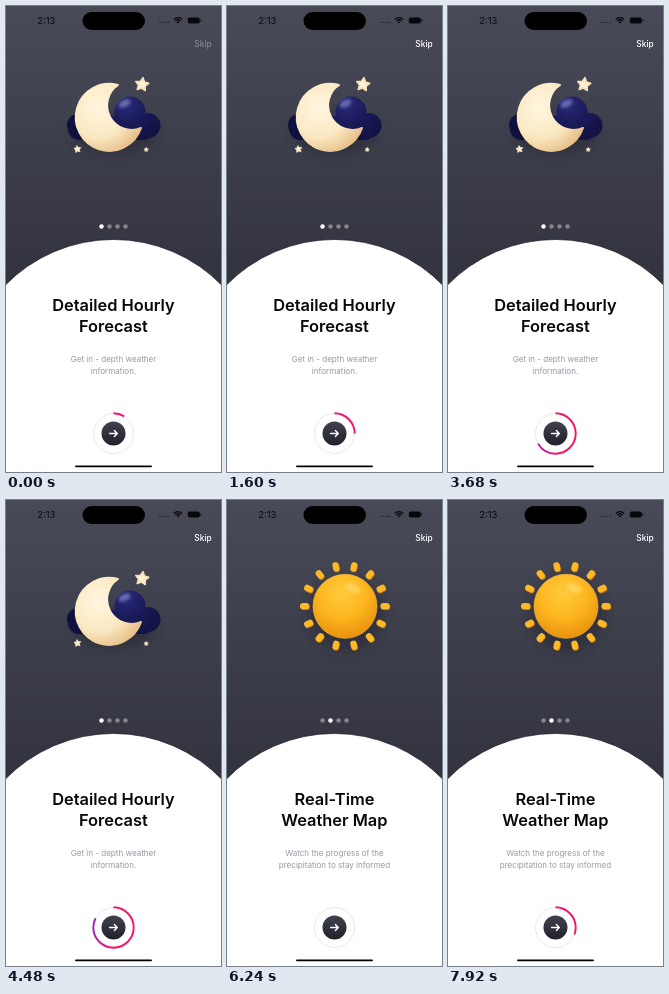
These frames come from a looping animation (215 by 466 pixels, 8 s). An HTML page:

```html
<!DOCTYPE html>
<html lang="en">
<head>
<meta charset="utf-8">
<title>Weather onboarding</title>
<style>
  html, body { margin: 0; width: 100%; height: 100%; overflow: hidden; background: #fff; }
  svg { display: block; width: 100vw; height: 100vh; font-family: Inter, Roboto, sans-serif; }
  .title { font-size: 16.4px; font-weight: 600; fill: #08080c; text-anchor: middle; }
  .note { font-size: 8.05px; fill: #9799a4; text-anchor: middle; }
</style>
</head>
<body>
<svg viewBox="0 0 215 466">
  <defs>
    <linearGradient id="sky" x2="0" y2="1">
      <stop stop-color="#484a58"/><stop offset="1" stop-color="#31323d"/>
    </linearGradient>
    <radialGradient id="moonFill" cx=".35" cy=".35" r=".75">
      <stop stop-color="#fff6df"/><stop offset=".6" stop-color="#fbe8c2"/><stop offset="1" stop-color="#e6bd85"/>
    </radialGradient>
    <radialGradient id="cloudFill" gradientUnits="userSpaceOnUse" cx="120" cy="98" r="46">
      <stop stop-color="#2a2a78"/><stop offset=".4" stop-color="#1b1b5c"/><stop offset="1" stop-color="#10103e"/>
    </radialGradient>
    <radialGradient id="sunFill" cx=".45" cy=".3" r=".75">
      <stop stop-color="#ffcb3c"/><stop offset=".5" stop-color="#fdb61f"/><stop offset="1" stop-color="#e58d0b"/>
    </radialGradient>
    <linearGradient id="ringStroke" gradientUnits="userSpaceOnUse" x1="107" y1="0" x2="87" y2="0"
      gradientTransform="rotate(90 107.5 427.5)">
      <stop stop-color="#f8106a"/><stop offset="1" stop-color="#a11fb8"/>
    </linearGradient>
    <linearGradient id="buttonFill" x2="0" y2="1">
      <stop stop-color="#41424f"/><stop offset="1" stop-color="#20212a"/>
    </linearGradient>
    <filter id="blur" x="-50%" y="-50%" width="200%" height="200%"><feGaussianBlur stdDeviation="6"/></filter>
    <filter id="glow" x="-50%" y="-50%" width="200%" height="200%"><feGaussianBlur stdDeviation="1.8"/></filter>
    <g id="rays"></g>
  </defs>

  <rect width="215" height="290" fill="url(#sky)"/>
  <path d="M-2 280.5A151 151 0 0 1 217 280.5V468H-2Z" fill="#fff" stroke="#1b1c27" stroke-width=".7"/>

  <!-- status bar -->
  <text x="31.2" y="18" font-size="9.5" fill="#0c0c11">2:13</text>
  <rect x="76.5" y="6" width="62.5" height="18" rx="9"/>
  <g fill="#08080c">
    <g id="signal" opacity=".75"></g>
    <rect x="181.8" y="11.6" width="12" height="5.8" rx="1.6"/>
    <rect x="194.4" y="13.4" width="1" height="2.2" rx=".5"/>
    <path d="M172 17.6l-1.5-1.7a2.2 2.2 0 0 1 3 0Z"/>
  </g>
  <path d="M167.8 13.4a6 6 0 0 1 8.4 0M169.3 15a3.9 3.9 0 0 1 5.4 0"
    fill="none" stroke="#08080c" stroke-width="1.3"/>
  <text id="skip" x="188.3" y="41.2" font-size="8.4" font-weight="500" fill="#fff">Skip</text>

  <g id="night">
    <ellipse cx="108" cy="128" rx="42" ry="20" fill="#1d1e29" opacity=".4" filter="url(#blur)"/>
    <g fill="url(#cloudFill)">
      <circle cx="72" cy="119" r="11"/>
      <rect x="62" y="110" width="86" height="24" rx="11"/>
      <circle cx="142" cy="119.5" r="12.5"/>
      <circle cx="124" cy="106" r="15.5"/>
    </g>
    <ellipse cx="118.5" cy="97.5" rx="6.5" ry="3.5" fill="#8f95d8" opacity=".6"
      transform="rotate(-25 118.5 97.5)" filter="url(#glow)"/>
    <path d="M112 79A33.5 33.5 0 1 0 135 122A24.5 24.5 0 0 1 112 79Z"
      fill="url(#moonFill)" stroke="url(#moonFill)" stroke-width="2" stroke-linejoin="round"/>
    <g id="stars" fill="#fdf1d8" stroke="#f8dfb6" stroke-linejoin="round"></g>
    <text class="title"><tspan x="107.4" y="305.4">Detailed Hourly</tspan><tspan x="107.4" y="325.6">Forecast</tspan></text>
    <text class="note"><tspan x="107.5" y="355.5">Get in - depth weather</tspan><tspan x="107.5" y="368.2">information.</tspan></text>
  </g>

  <g id="day">
    <circle cx="119" cy="114" r="38" fill="#1d1e29" opacity=".4" filter="url(#blur)"/>
    <use href="#rays" x=".4" y=".6" fill="#d9820c"/>
    <use href="#rays" x="-.2" y="-.3" fill="#fdb828"/>
    <circle cx="118" cy="106.3" r="32" fill="url(#sunFill)" stroke="#f9b63a" stroke-width=".7"/>
    <ellipse cx="126" cy="88" rx="8" ry="4.5" fill="#ffdc74" opacity=".6"
      transform="rotate(25 126 88)" filter="url(#glow)"/>
    <text class="title"><tspan x="107.4" y="305.4">Real-Time</tspan><tspan x="107.4" y="325.6">Weather Map</tspan></text>
    <text class="note"><tspan x="107.5" y="355.5">Watch the progress of the</tspan><tspan x="107.5" y="368.2">precipitation to stay informed</tspan></text>
  </g>

  <g id="dots" fill="#fff"></g>

  <!-- progress button -->
  <g fill="none" transform="rotate(-90 107.5 427.5)">
    <circle cx="107.5" cy="427.5" r="20" stroke="#e3e4ea" stroke-width=".8"/>
    <circle id="ring" cx="107.5" cy="427.5" r="20.2" pathLength="360" stroke="url(#ringStroke)" stroke-width="1.9"/>
  </g>
  <circle cx="107.5" cy="427.5" r="12" fill="url(#buttonFill)"/>
  <path d="M103.6 427.5H111.2M108.4 424.6L111.3 427.5L108.4 430.4" fill="none" stroke="#fff"
    stroke-width="1.4" stroke-linecap="round" stroke-linejoin="round"/>
  <rect x="69" y="459.4" width="77" height="1.9" rx=".95"/>
</svg>
<script>
  const LOOP = 8000, CYCLE = 6040;
  const GROW_START = 350, GROW_TIME = 5000;
  const FULL = GROW_START + GROW_TIME;
  const RESET_START = 5378, RESET_TIME = 840;
  const RAYS = 14;
  const NS = 'http://www.w3.org/2000/svg';
  const $ = id => document.getElementById(id);
  const clamp = v => Math.min(1, Math.max(0, v));
  const easeInOut = p => p < .5 ? 2 * p * p : 1 - 2 * (1 - p) ** 2;

  function add(parent, tag, attrs) {
    const el = document.createElementNS(NS, tag);
    for (const key in attrs) el.setAttribute(key, attrs[key]);
    return $(parent).appendChild(el);
  }

  function addStar(x, y, r, tilt) {
    const points = Array.from({ length: 10 }, (_, i) => {
      const a = (i * 36 + tilt - 90) * Math.PI / 180, d = i % 2 ? r * .52 : r;
      return [x + d * Math.cos(a), y + d * Math.sin(a)].map(v => v.toFixed(2)).join();
    });
    add('stars', 'polygon', { points: points.join(' '), 'stroke-width': r * .25 });
  }

  addStar(136, 78.5, 6.8, 8);
  addStar(71.5, 143.2, 3.6, -8);
  addStar(140.2, 143.6, 2.3, 8);

  for (let i = 0; i < RAYS; i++) {
    add('rays', 'rect', {
      x: 114.9, y: 61.5, width: 6.2, height: 9.2, rx: 2.9,
      transform: `rotate(${(i + .5) * 360 / RAYS} 118 106.3)`
    });
  }
  for (let i = 0; i < 4; i++) add('signal', 'circle', { cx: 154 + i * 2.8, cy: 16.4, r: .65 });
  const dots = [0, 1, 2, 3].map(i => add('dots', 'circle', { cx: 95.5 + i * 8, cy: 220.5, r: 2.2 }));

  // Ring angle: steady growth over one page, then an eased retreat to zero.
  function ringAngle(t) {
    const c = t < GROW_START ? t + CYCLE : t;
    const reset = easeInOut(clamp((c - RESET_START) / RESET_TIME));
    if (c < GROW_START + CYCLE && c >= RESET_START) return 360 * (1 - reset);
    const start = c < RESET_START ? GROW_START : GROW_START + CYCLE;
    return 360 * clamp((c - start) / GROW_TIME);
  }

  function draw(t) {
    const turn = clamp((t - FULL) / 240);
    $('night').setAttribute('opacity', 1 - turn);
    $('day').setAttribute('opacity', turn);
    $('skip').setAttribute('opacity', .35 + .65 * clamp(t / 400));
    $('ring').setAttribute('stroke-dasharray', `${ringAngle(t).toFixed(2)} 720`);
    dots.forEach((dot, i) => {
      const active = i === 0 ? 1 - turn : i === 1 ? turn : 0;
      dot.setAttribute('opacity', .4 + .6 * active);
    });
  }

  const begin = performance.now();
  function tick() {
    draw((performance.now() - begin) % LOOP);
    requestAnimationFrame(tick);
  }
  draw(0);
  requestAnimationFrame(tick);
</script>
</body>
</html>
```
